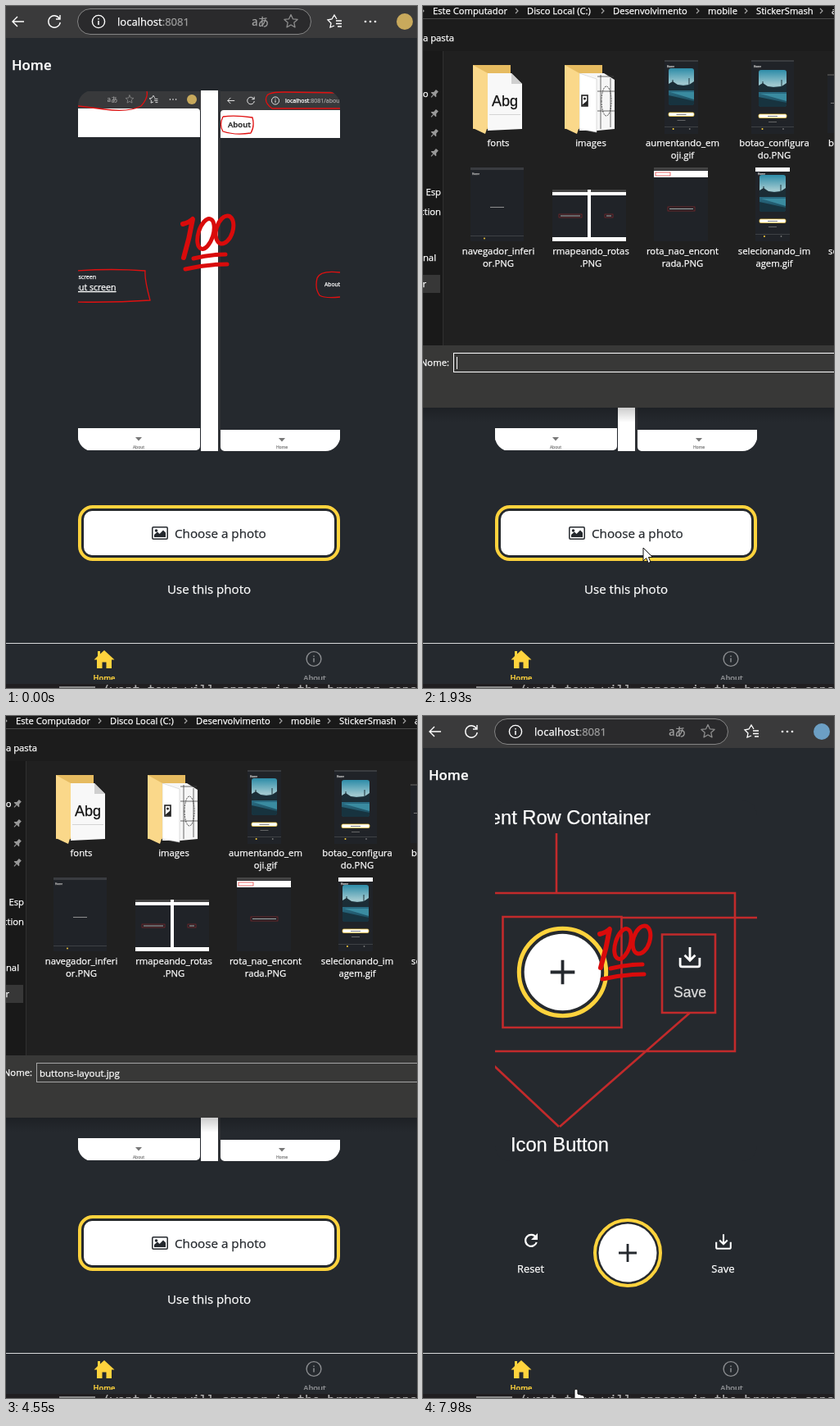
Animation of 502x832 px, one loop 8 s. Source, as an HTML page:

```html
<!DOCTYPE html>
<html lang="en">
<head>
<meta charset="utf-8">
<title>Photo picker demo</title>
<style>
html, body { margin: 0; width: 100%; height: 100%; overflow: hidden; background: #25292e; }
svg { display: block; width: 100vw; height: 100vh; }
text { font-family: "Open Sans", "Noto Sans", sans-serif; }
.arial { font-family: "Liberation Sans", Arial, sans-serif; }
.cjk { font-family: "Noto Sans CJK JP", "Noto Sans CJK", sans-serif; }
.mono { font-family: "DejaVu Sans Mono", monospace; }
</style>
</head>
<body>
<svg id="stage" viewBox="0 0 502 832" xmlns="http://www.w3.org/2000/svg"></svg>
<script>
const BG = '#25292e', RED = '#e01010', GOLD = '#ffd33d', WHITE = '#fff', NAVY = '#202328', MAROON = '#84262a';

const rect = (x, y, w, h, fill, extra = '') =>
  `<rect x="${x}" y="${y}" width="${w}" height="${h}" fill="${fill}" ${extra}/>`;
const line = (d, stroke, width = 1.5, extra = '') =>
  `<path d="${d}" fill="none" stroke="${stroke}" stroke-width="${width}" ${extra}/>`;
const shape = (d, fill, extra = '') => `<path d="${d}" fill="${fill}" ${extra}/>`;
const disc = (x, y, r, fill, extra = '') => `<circle cx="${x}" cy="${y}" r="${r}" fill="${fill}" ${extra}/>`;
const frame = (x, y, w, h, stroke, width, extra = '') =>
  rect(x, y, w, h, 'none', `stroke="${stroke}" stroke-width="${width}" ${extra}`);
// A hairline stroke gives the text the heavier look of hinted type
const text = (x, y, size, str, fill = WHITE, extra = '') =>
  `<text x="${x}" y="${y}" font-size="${size}" fill="${fill}" stroke="${fill}" stroke-width=".25" ${extra}>${str}</text>`;
const group = (body, extra = '') => `<g ${extra}>${body}</g>`;
const at = (x, y, body, k = 1) => group(body, `transform="translate(${x} ${y}) scale(${k})"`);
const MID = 'text-anchor="middle"', END = 'text-anchor="end"', SEMI = 'font-weight="600"';
const ROUND = 'stroke-linecap="round" stroke-linejoin="round"';

// Icons, each centred on its own origin
const star = (() => {
  let d = '';
  for (let i = 0; i < 10; i++) {
    const a = Math.PI * i / 5, r = i % 2 ? 4 : 8.5;
    d += `${i ? 'L' : 'M'}${(r * Math.sin(a)).toFixed(1)} ${(-r * Math.cos(a)).toFixed(1)}`;
  }
  return d + 'Z';
})();
const icon = {
  back: line('M7 0H-7M-1-6L-7 0L-1 6', WHITE, 1.4),
  reload: line('M6.6-3A7.2 7.2 0 1 0 7.2 1M7-8V-3H2', WHITE, 1.4),
  info: (c, r) => disc(0, 0, r, 'none', `stroke="${c}" stroke-width="1.4"`) + line('M0-1V4M0-4V-2.5', c, 1.5),
  kana: text(-9, 5, 13.5, 'aあ', '#a2a2a2', 'class="cjk"'),
  star: line(star, '#8c8c8c', 1.3, ROUND),
  list: line('M0 5L-5 7L-4 2L-8-2L-3-3L0-8L3-3M2-1H9M2 2.5H9M4 6H9', WHITE, 1.3),
  dots: [-6, 0, 6].map(x => disc(x, 0, 1.3, WHITE)).join(''),
  badge: disc(0, 0, 10, '#c8a95c', 'class="badge"'),
  save: line('M0-11V4M-6-2L0 4L6-2M-11 1V9Q-11 11-9 11H9Q11 11 11 9V1', WHITE, 2.6),
  plus: line('M-11 0H11M0-11V11', BG, 2.8),
};

const tools = (xs, y, k) =>
  ['kana', 'star', 'list', 'dots', 'badge'].map((n, i) => at(xs[i], y, icon[n], k)).join('');
const nav = (xs, y, k) =>
  at(xs[0], y, icon.back, k) + at(xs[1], y, icon.reload, k) + at(xs[2], y, icon.info(WHITE, 7.6), k);
const address = (x, y, size, tail) =>
  text(x, y, size, `localhost<tspan fill="#a0a0a0" stroke="#a0a0a0">:8081${tail}</tspan>`);

function browser() {
  return rect(0, 0, 502, 39, '#3a3a3b') +
    rect(87.5, 3.5, 285, 31, '#2a2a2c', 'rx="15.5" stroke="#858585"') +
    nav([15, 59, 113], 19, 1) + address(136, 24, 13.05, '') +
    tools([309, 348, 401, 445, 487], 19, 1) +
    text(7, 78, 16.8, 'Home', WHITE, SEMI);
}

function tabs() {
  return rect(0, 777, 502, 1, '#d8d9da') +
    shape('M120 786L132.500 797.500H129V808H122.500V800.500H117.500V808H111V797.500H107.500L112 793V787H115V790.500Z', GOLD) +
    at(376, 796.5, icon.info('#8b8d90', 8.9)) +
    group(text(120, 822.5, 9.3, 'Home', GOLD, MID + SEMI) +
      text(377, 822.5, 9.4, 'About', '#8b8d90', MID + SEMI), 'clip-path="url(#tabClip)"') +
    rect(0, 827, 502, 5, '#201e20') + rect(65, 830, 44, 2, '#8a8a8a') +
    text(118, 840, 15.2, '(wont tour will appear in the browser cons', '#b5b5b5', 'class="mono"');
}

function routesImage() {
  const footer = (x, y, label) =>
    shape(`M${x - 4} ${y}h8l-4 4.500z`, '#777') + text(x, 539.5, 5, label, '#888', MID);
  return rect(88, 103, 320, 440, BG) + rect(88, 104, 320, 24, '#38393b') +
    rect(80, 125, 157, 35, WHITE, 'rx="4"') + rect(88, 150, 149, 10, WHITE) +
    rect(262, 127, 160, 34, WHITE, 'rx="4"') + rect(262, 150, 146, 11, WHITE) +
    rect(80, 515, 157, 27, WHITE, 'rx="5"') + rect(88, 515, 149, 15, WHITE) +
    rect(262, 517, 160, 26, WHITE, 'rx="5"') + rect(262, 517, 146, 15, WHITE) +
    rect(238, 103, 21, 440, WHITE) + rect(259, 103, 3, 440, '#303236') +
    tools([129, 151, 180, 204, 227], 114, 0.6) +
    nav([275, 299, 329], 115.5, 0.6) + address(341, 118, 7, '/about') +
    text(271, 148, 9.6, 'About', '#222', SEMI) +
    text(110, 333, 7, 'About screen', WHITE, END) +
    text(134.5, 347, 10.6, 'Go to About screen', WHITE, END + ' text-decoration="underline"') +
    text(389, 342, 6.8, 'About screen') +
    footer(162, 526, 'About') + footer(337, 527, 'Home') +
    line('M88 122Q105 124 120 126Q150 130 165 122Q174 112 172 104M86 323Q130 320 170 323Q169 333 176 359Q130 362 86 361' +
      'M408 125L325 125Q314 117 319 109Q322 105 340 105L408 106' +
      'M265 135Q280 133 301 136Q304 147 299 155Q280 158 265 153Q260 145 265 135' +
      'M408 325Q384 322 380 332Q377 345 383 353Q390 357 408 355', RED, 1.3);
}

function layoutImage() {
  return rect(88, 103, 320, 440, BG) +
    text(278, 131.5, 23.7, 'Component Row Container', WHITE, `class="arial" ${END}`) +
    text(107, 530.5, 23.7, 'Icon Button', WHITE, 'class="arial"') +
    line('M163 143V215M86 216H381V409H86M97.500 245H242.500V380H97.500ZM243 246H408' +
      'M292 266.500H357V362H292ZM86 426L166 501M326 362L167 501', '#c22a2b', 2.6) +
    disc(170.5, 312.5, 53.2, BG, `stroke="${GOLD}" stroke-width="5"`) + disc(170.5, 312.5, 46.8, WHITE) +
    at(170.5, 312.5, icon.plus, 1.35) + at(326, 294, icon.save, 1.08) +
    text(326, 343, 17.6, 'Save', '#dcdcdc', `class="arial" ${MID}`);
}

function hundred() {
  const oval = (x, y, rx, ry) =>
    `<ellipse cx="${x}" cy="${y}" rx="${rx}" ry="${ry}" transform="rotate(17 ${x} ${y})" fill="none" stroke="#d90b0b" stroke-width="5"/>`;
  return line('M216 266Q224 264 228 260Q224 284 217 307', '#d90b0b', 6, ROUND) +
    oval(244, 278, 9, 19) + oval(267, 273, 10, 17.5) +
    line('M229 308Q248 303 268 303M219 321Q244 315 270 315', '#d90b0b', 5, ROUND);
}

function pickButtons() {
  return rect(90, 611, 316, 64, BG, `rx="16" stroke="${GOLD}" stroke-width="4"`) +
    rect(95, 616, 306, 54, WHITE, 'rx="10"') +
    frame(178.8, 635.8, 18.4, 14.4, BG, 1.5, 'rx="1.2"') +
    shape('M181 648V645L185 641.500L187.500 644L192 639.500L195 642.500V648Z', BG) + disc(183.5, 640, 1.8, BG) +
    text(206, 649, 15.2, 'Choose a photo', BG) + text(197, 717, 15.1, 'Use this photo');
}

function editButtons() {
  return at(132, 640, line('M6-4A7 7 0 1 0 6.8 2', WHITE, 2.2) + shape('M8-9V-1H0Z', WHITE)) +
    text(131.5, 679, 12.8, 'Reset', WHITE, MID) +
    disc(250, 655, 40, BG, `stroke="${GOLD}" stroke-width="4"`) + disc(250, 655, 35.5, WHITE) +
    at(250, 655, icon.plus) + at(367, 641, icon.save, 0.8) + text(366.5, 679, 13.1, 'Save', WHITE, MID);
}

// File dialog parts
const folder = (x, inside) => at(x, 70,
  shape('M0 2H46V20H18V80H0Z', '#e6bb60') + inside +
  shape('M0 2L18 12V77L15 86L0 79Z', '#fad88a'));

function poolPhone(x, y, w, px, py, pw, top) {
  const right = px + pw, cx = px + pw / 2;
  return rect(x, y, w, 90, NAVY) + rect(x, y, w, top ? 5 : 2, top ? WHITE : '#3a3c40') +
    text(x + 3, y + 9, 3.2, 'Home', '#bbb') +
    rect(px, py, pw, 45, 'url(#sky)', 'rx="3"') +
    shape(`M${px} ${py + 19}l5-3 6 4 7 1 ${pw - 24}-1 6-4v11h${-pw}z`, '#1b2d36') +
    shape(`M${px + 2} ${py + 29}h${pw - 2}v9z`, '#3a8ba0') +
    shape(`M${px} ${py + 33}L${right} ${py + 40}v2q0 3-3 3h${6 - pw}q-3 0-3-3z`, '#17333f') +
    line(`M${px + 5} ${py + 22}V${py + 14}M${right - 6} ${py + 22}V${py + 12}`, '#1c3038', 1) +
    rect(px, py + 54, pw, 4.5, WHITE, `rx="1.5" stroke="${GOLD}" stroke-width=".7"`) +
    rect(cx - 6, py + 56, 12, 0.8, '#666') + rect(cx - 5, py + 63, 10, 0.8, '#777') +
    rect(x, y + 81, w, 0.5, '#5c5e62') + disc(x + w * 0.26, y + 84, 1, GOLD) + disc(x + w * 0.75, y + 84, 0.9, '#777');
}

function dialog() {
  const label = (col, y, ...rows) =>
    rows.map((s, i) => text([92, 205, 317, 429][col], y + i * 15, 11.3, s, WHITE, MID)).join('');
  const crumbs = [[12, 'Este Computador'], [127, 'Disco Local (C:)'], [232, 'Desenvolvimento'],
    [348, 'mobile'], [407, 'StickerSmash'], [499, 'assets']];
  const pin = y => at(14, y, group(shape('M-2-5H2V-1L4 1V2H-4V1L-2-1Z', '#999') + line('M0 2V6', '#999', 1.1), 'transform="rotate(42)"'));
  const sketch = shape('M18 12H48L61 20V80L40 82H18Z', '#f6f6f6') +
    line('M40 16H60M40 34H61M40 58H61M44 14V80M56 18V78', '#444', 0.8) +
    line('M45 46a6 18 0 1 0 12 0a6 18 0 1 0-12 0', '#444', 1, 'stroke-dasharray="2 1"') +
    shape('M18 12L39 19V84L18 80Z', WHITE, 'stroke="#ccc" stroke-width=".6"') +
    frame(21, 39, 7, 13, '#222', 1.6) + disc(24.5, 43, 1.5, '#222') + shape('M21 51L28 45V52Z', '#222');
  const fonts = shape('M18 12H47L60 25V80L18 82Z', '#f8f8f8') + shape('M47 12V25H60Z', '#cfcfcf') +
    text(23, 52, 18, 'Abg', '#111', 'class="arial"') + rect(20, 62, 38, 0.8, '#ccc');
  const mark = (x, y, w, h, color = MAROON) =>
    frame(x, y, w, h, color, 0.7) + rect(x + 2, y + h / 2 - 0.5, w - 4, 1, '#a9a9a9');
  return rect(0, 0, 502, 414, '#202020') + rect(0, 0, 502, 15, '#191919') + rect(0, 15, 502, 1, '#484848') +
    rect(0, 16, 502, 39, '#1c1c1c') + rect(0, 55, 24, 359, '#191919') + rect(24, 55, 1, 359, '#303030') +
    crumbs.map(([x, s], i) => text(x, 10, 11.2, s) +
      line(`M${x - 14} 3L${x - 11} 6L${x - 14} 9`, '#aaa', 1.1)).join('') +
    text(38, 43, 11.3, 'Nova pasta', WHITE, END) +
    text(6.5, 111, 11.3, 'o', WHITE, END) + [107, 131, 155, 179].map(pin).join('') +
    text(22, 231, 11.3, 's Esp', WHITE, END) + text(22, 255, 11.3, 'ction', WHITE, END) +
    text(16, 311, 11.3, 'nal', WHITE, END) + rect(0, 328, 21, 22, '#373737') + text(4, 343, 11.3, 'r', WHITE, END) +
    rect(376, 61, 105, 130, '#343434', 'id="hoverTop"') + rect(376, 193, 105, 130, '#343434', 'id="hoverLow"') +
    folder(61, fonts) + folder(173, sketch) +
    poolPhone(295, 66, 41, 300, 76, 31) + poolPhone(401, 66, 52, 410, 78, 34) +
    rect(494, 83, 20, 72, NAVY) + rect(494, 83, 20, 2, '#444') + rect(498, 118, 10, 1, '#777') +
    label(0, 171, 'fonts') + label(1, 171, 'images') +
    label(2, 171, 'aumentando_em', 'oji.gif') + label(3, 171, 'botao_configura', 'do.PNG') + text(495, 171, 11.3, 'botoes') +
    rect(58, 197, 65, 90, NAVY) + rect(58, 197, 65, 3, '#3a3c40') + text(60, 206, 3.2, 'Home', '#aaa') +
    rect(82, 245, 17, 1, '#8f8f8f') + rect(58, 280, 65, 0.5, '#5c5e62') + disc(75, 283.5, 0.9, GOLD) +
    rect(158, 224, 90, 63, WHITE) + rect(158, 231, 43, 51, NAVY) + rect(205, 231, 43, 51, NAVY) +
    rect(158, 224, 43, 3, '#444') + rect(205, 224, 43, 3, '#444') +
    mark(166, 254, 28, 4) + mark(222, 254, 10, 4) +
    rect(282, 197, 66, 90, NAVY) + rect(282, 197, 66, 3, '#444') + rect(282, 201, 66, 8, WHITE) +
    frame(284, 203, 18, 4, RED, 0.6) + mark(299, 245, 33, 5) +
    poolPhone(406, 197, 42, 411, 206, 32, true) +
    label(0, 303, 'navegador_inferi', 'or.PNG') + label(1, 303, 'rmapeando_rotas', '.PNG') +
    label(2, 303, 'rota_nao_encont', 'rada.PNG') + label(3, 303, 'selecionando_im', 'agem.gif') + text(495, 303, 11.3, 'sel') +
    rect(0, 414, 502, 76, '#383837') + text(32, 439, 11.3, 'Nome:', WHITE, END) +
    rect(37.5, 423.5, 480, 23, '#383837', 'id="field" stroke="#fff"') +
    text(41, 440, 11.5, '', WHITE, 'id="fileName"') + rect(41, 428, 1, 15, WHITE, 'id="caret"');
}

const blankDialog = rect(0, 0, 502, 414, WHITE) + rect(0, 414, 502, 76, '#343434') +
  rect(5, 428, 35, 14, WHITE, 'opacity=".75"') + rect(45, 424, 457, 23, WHITE, 'opacity=".8"');
const hand = 'M-2 1Q0-1 2 1V6L9 8Q11 9 10 14L8 20H-2L-6 13Q-6 10-4 11L-2 13Z';
const arrow = 'M0 0V16L3.700 12.500L6.300 18.500L9 17.300L6.500 11.500H11.500Z';

const stage = document.getElementById('stage');
stage.innerHTML =
  `<defs>
    <clipPath id="photoClip"><rect x="88" y="103" width="320" height="440" rx="18"/></clipPath>
    <clipPath id="tabClip"><rect y="778" width="502" height="44"/></clipPath>
    <linearGradient id="sky" x2="0" y2="1"><stop stop-color="#2d8ca8"/><stop offset=".42" stop-color="#a4cbd1"/><stop offset=".6" stop-color="#2a6d84"/><stop offset="1" stop-color="#1a4656"/></linearGradient>
    <linearGradient id="shade" x2="0" y2="1"><stop stop-opacity=".2"/><stop offset="1" stop-opacity="0"/></linearGradient>
  </defs>` +
  rect(0, 0, 502, 832, BG) + browser() +
  group(group(routesImage(), 'id="before"') + group(layoutImage(), 'id="after"'), 'clip-path="url(#photoClip)"') +
  hundred() + group(pickButtons(), 'id="pick"') + group(editButtons(), 'id="edit"') + tabs() +
  group(rect(0, 490, 502, 18, 'url(#shade)') + dialog(), 'id="dialog"') + group(blankDialog, 'id="blank"') +
  group(shape(arrow, WHITE, 'id="arrow" stroke="#111"') + shape(hand, WHITE, 'id="hand" stroke="#111"'), 'id="cursor"');

const el = id => document.getElementById(id);
const show = (id, on) => el(id).setAttribute('display', on ? 'inline' : 'none');
const attr = (id, name, value) => el(id).setAttribute(name, value);
const within = (t, a, b) => t >= a && t < b;

// start, end, number of steps, way points
const moves = [
  [500, 1270, 12, [[212, 826], [232, 715], [244, 638], [250, 665]]],
  [1790, 1930, 3, [[254, 664], [269, 661]]],
  [2000, 2400, 7, [[282, 640], [360, 420], [425, 210]]],
  [2470, 2820, 6, [[430, 150], [432, 240], [428, 415]]],
  [5940, 6080, 3, [[427, 433], [352, 465]]],
  [6350, 6750, 7, [[340, 500], [236, 640], [320, 660], [427, 664]]],
  [7170, 7440, 5, [[400, 663], [116, 664]]],
  [7580, 7980, 6, [[119, 672], [150, 750], [187, 821]]],
];

function pointer(t) {
  const move = moves.filter(m => t >= m[0]).pop();
  if (!move || within(t, 2890, 5940)) return null;
  const [start, end, steps, pts] = move;
  const step = Math.floor((t - start) / (end - start) * (steps - 1) + 0.02);
  const p = Math.min(1, step / (steps - 1)) * (pts.length - 1);
  const i = Math.min(pts.length - 2, Math.floor(p));
  return pts[i].map((v, k) => v + (pts[i + 1][k] - v) * (p - i));
}

function draw(t) {
  const done = t >= 5350;
  show('before', !done);
  show('after', done);
  show('pick', !done);
  show('edit', done);
  document.querySelectorAll('.badge').forEach(b => b.setAttribute('fill', t < 1660 ? '#c8a95c' : '#6c9fc4'));

  const stepIn = t < 1730 ? 0 : t < 1790 ? 1 : 2;
  show('blank', within(t, 1660, 1860));
  attr('blank', 'opacity', [0.3, 0.6, 0.88][stepIn]);
  attr('blank', 'transform', `translate(0 ${[-9, -5, -1][stepIn]})`);
  show('dialog', within(t, 1860, 5350));
  attr('dialog', 'opacity', t < 5210 ? 1 : t < 5280 ? 0.5 : 0.2);
  attr('field', 'stroke', t < 4550 ? WHITE : '#a5a5a5');
  el('fileName').textContent = t < 4280 ? '' : 'buttons-layout.jpg';
  show('caret', within(t, 1860, 2820) || within(t, 3350, 3950));

  const p = pointer(t);
  const over = (y0, y1) => !!p && t < 2890 && p[0] > 376 && p[0] < 481 && p[1] >= y0 && p[1] < y1;
  show('hoverTop', over(61, 191));
  show('hoverLow', over(193, 323));
  show('cursor', !!p);
  if (p) {
    attr('cursor', 'transform', `translate(${p[0].toFixed(1)} ${p[1].toFixed(1)})`);
    show('hand', p[1] > 778);
    show('arrow', p[1] <= 778);
  }
}

const begin = performance.now();
function tick() {
  draw((performance.now() - begin) % 8000);
  requestAnimationFrame(tick);
}
draw(0);
requestAnimationFrame(tick);
</script>
</body>
</html>
```
